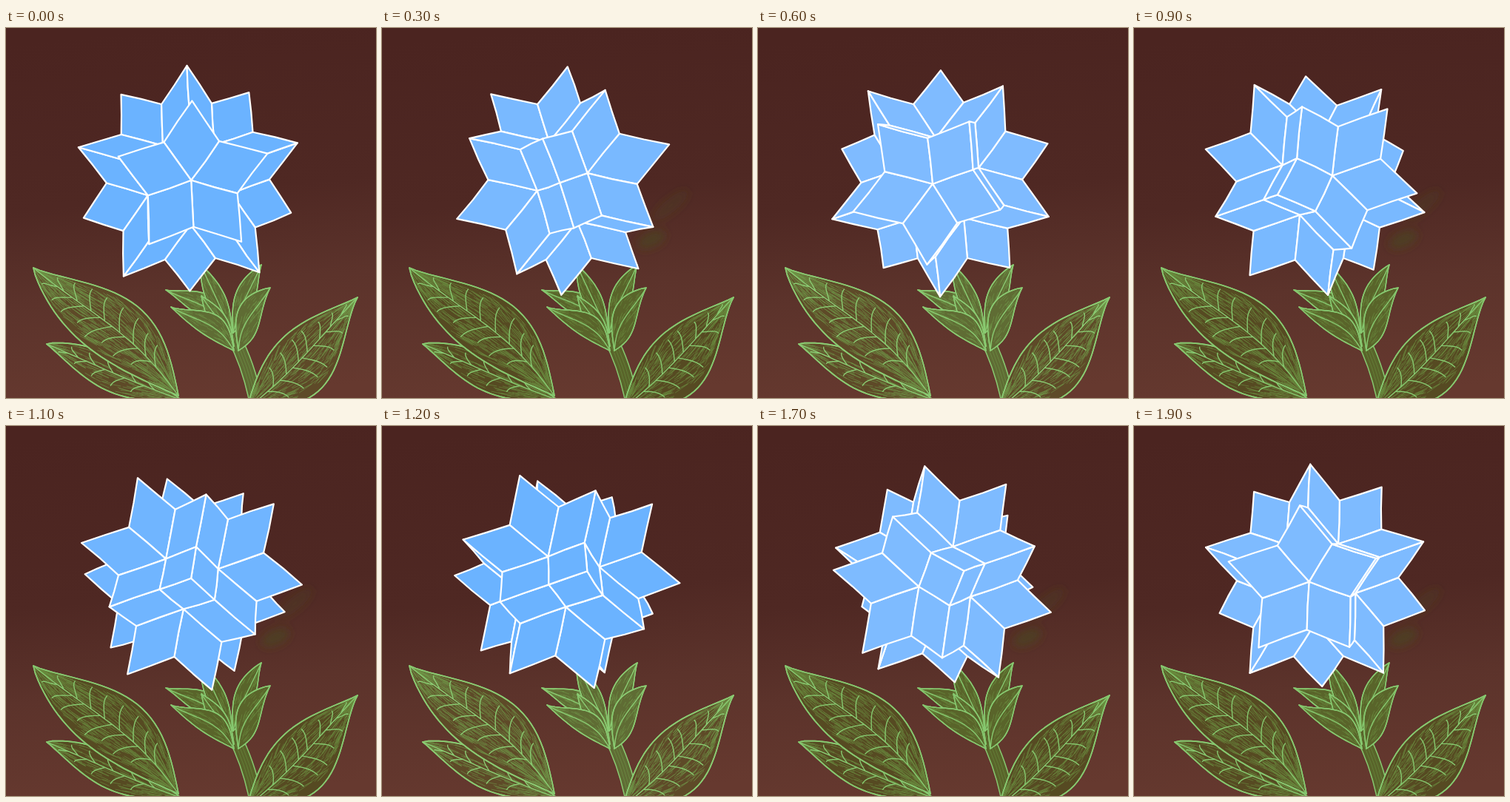
Write an HTML page that moves like this. It is 500 by 500 pixels and loops after 2 s.

```html
<!DOCTYPE html>
<html lang="en">
<head>
<meta charset="utf-8">
<title>Crystal flower</title>
<style>
  html, body { margin: 0; width: 100%; height: 100%; overflow: hidden; background: #4c2521; }
  svg { display: block; width: 100vw; height: 100vh; }
  path { stroke-linecap: round; stroke-linejoin: round; }
  #plant path { fill: none; stroke: var(--line); }
  #plant .leaf { fill: var(--leaf); stroke-width: 1.7; }
  #plant .sepal { fill: var(--sepal); stroke-width: 1.5; }
  #plant .hatch { stroke: var(--hatch); stroke-width: .9; opacity: .65; }
  #plant .vein { stroke-width: 1.4; }
  #gem path { stroke: #fff; stroke-width: 2.2; }
  #smudge { fill: #48481c; }
</style>
</head>
<body>
<svg viewBox="0 0 500 500">
  <defs>
    <linearGradient id="soil" x1=".45" y1="0" x2=".55" y2="1">
      <stop offset="0" stop-color="#4b2420"/>
      <stop offset=".45" stop-color="#4f2823"/>
      <stop offset=".7" stop-color="#5c332b"/>
      <stop offset="1" stop-color="#66392f"/>
    </linearGradient>
    <filter id="soft" x="-1" y="-1" width="3" height="3"><feGaussianBlur stdDeviation="6"/></filter>
  </defs>
  <rect width="500" height="500" fill="url(#soil)"/>
  <g id="smudge" filter="url(#soft)">
    <ellipse cx="364" cy="286" rx="20" ry="10" opacity=".6" transform="rotate(-25 364 286)"/>
    <ellipse cx="390" cy="240" rx="30" ry="9" opacity=".3" transform="rotate(-40 390 240)"/>
  </g>
  <g id="plant"></g>
  <g id="gem"></g>
</svg>
<script>
const $ = id => document.getElementById(id);
const { sin, cos, abs, PI } = Math;
const plant = $('plant'), gem = $('gem');

function addPath(parent, d, cls) {
  const el = document.createElementNS('http://www.w3.org/2000/svg', 'path');
  el.setAttribute('d', d);
  if (cls) el.setAttribute('class', cls);
  return parent.appendChild(el);
}

let seed = 7;
const rand = () => (seed = (seed * 16807) % 2147483647) / 2147483647;
const pt = p => p[0].toFixed(1) + ' ' + p[1].toFixed(1);
const line = pts => 'M' + pts.map(pt).join('L');
const range = (n, f) => Array.from({ length: n }, (_, i) => f(i));

// A blade from tip to base. Each side is [width, skew]; bow bends the midrib.
function blade({ tip, base, left, right, bow, veins = 0, hatch, kind = 'leaf' }) {
  const dx = base[0] - tip[0], dy = base[1] - tip[1], len = Math.hypot(dx, dy);
  // t runs along the midrib, side from -1 (left edge) to 1 (right edge)
  const at = (t, side) => {
    const [width, skew] = side < 0 ? left : right;
    const edge = Math.sign(side) * width * sin(PI * t ** skew);
    const mid = bow * sin(PI * t ** 1.5);
    const off = (mid + (edge - mid) * abs(side)) / len;
    return [tip[0] + dx * t + dy * off, tip[1] + dy * t - dx * off];
  };
  const along = side => range(31, i => at(i / 30, side));
  const rim = line([...along(1), ...along(-1).reverse()]) + 'Z';
  const strokes = range(hatch, () => {
    const t = rand() * .9, side = rand() * 1.8 - .9;
    return line([at(t, side), at(t + .06 + rand() * .04, side * (.8 + rand() * .2))]);
  }).join('');
  const ribs = range(veins * 2, i => {
    const side = i % 2 ? 1 : -1, reach = .6 + rand() * .2;
    const t = .14 + .72 * (i + rand() * .5) / (veins * 2);
    return line(range(7, k => at(t - .07 * sin(k / 6 * PI / 2), side * reach * k / 6)));
  }).join('');
  addPath(plant, rim, kind);
  addPath(plant, strokes, 'hatch');
  addPath(plant, rim, kind).style.fill = 'none';
  addPath(plant, line(along(0)) + ribs, 'vein');
}

function stem() {
  const d = 'M308 418Q328 456 338 506';
  addPath(plant, d).style.strokeWidth = 19;
  addPath(plant, d).style.cssText = 'stroke: var(--sepal); stroke-width: 16';
  for (const x of [-4, 0, 4])
    addPath(plant, d, 'hatch').setAttribute('transform', `translate(${x})`);
}

blade({ tip: [55, 427], base: [236, 502], right: [20, .8], left: [27, 1.1], bow: -2, veins: 5, hatch: 190 });
blade({ tip: [37, 324], base: [233, 497], right: [54, 1.18], left: [32, .83], bow: 12, veins: 8, hatch: 520 });
stem();
blade({ tip: [475, 364], base: [325, 515], right: [52, 1.25], left: [33, 1.1], bow: 5, veins: 7, hatch: 420 });

const sepal = (tip, base, left, right, bow) =>
  blade({ tip, base, left, right, bow, hatch: 80, kind: 'sepal' });
sepal([216, 354], [302, 402], [8, 1.3], [22, 1.2], 6);
sepal([262, 318], [306, 412], [13, 1], [12, 1], 0);
sepal([345, 320], [307, 412], [17, .9], [11, 1.3], -3);
sepal([264, 362], [308, 430], [10, 1], [12, 1], 2);
sepal([357, 351], [314, 436], [25, .85], [10, 1.8], -8);
sepal([223, 377], [308, 436], [5, 1], [26, 1.3], 10);

// Rhombic hexecontahedron: a prolate rhombohedron on every icosahedron face
const PHI = (1 + Math.sqrt(5)) / 2, NORM = Math.hypot(1, PHI);
const axes = [];
for (const s of [-1, 1]) for (const t of [-PHI, PHI])
  axes.push([s, 0, t], [t, s, 0], [0, t, s]);
axes.forEach(v => v.forEach((n, i) => v[i] = n / NORM));

const dot = (a, b) => a[0] * b[0] + a[1] * b[1] + a[2] * b[2];
const cross = (a, b) => [a[1] * b[2] - a[2] * b[1], a[2] * b[0] - a[0] * b[2], a[0] * b[1] - a[1] * b[0]];
const sum = (...vs) => [0, 1, 2].map(i => vs.reduce((n, v) => n + v[i], 0));
const near = (a, b) => dot(a, b) > .4;

const cells = [];
axes.forEach((a, i) => axes.forEach((b, j) => axes.forEach((c, k) => {
  if (!(i < j && j < k && near(a, b) && near(b, c) && near(a, c))) return;
  const [p, q, r] = dot(a, cross(b, c)) > 0 ? [a, b, c] : [a, c, b];
  const tip = sum(p, q, r);
  const face = (u, v, w) => [u, sum(u, v), tip, sum(u, w)];
  cells.push({ tip, faces: [face(p, q, r), face(q, r, p), face(r, p, q)] });
})));
const pool = range(60, () => addPath(gem, ''));

const RAD = PI / 180, TILT = 19.3 * RAD, STEPS = 20;
const CX = 246.5, CY = 207, FOCUS = 1036, EYE = 16;

const looks = [
  { leaf: '#5e4a28', sepal: '#5f6c34', hatch: '#6f9748', line: '#8acb72' },
  { leaf: '#564a22', sepal: '#59642a', hatch: '#6b8f40', line: '#86c86f' }
];

// Hand-drawn edge: a slight bend at the middle, same in both directions
function bend(p, q) {
  const x = (p[0] + q[0]) / 2, y = (p[1] + q[1]) / 2;
  return [x + sin(x * 3.1 + y) * .6, y + cos(x + y * 2.7) * .6];
}

function draw(step) {
  const look = looks[step % 2];
  for (const k in look) plant.style.setProperty('--' + k, look[k]);
  $('smudge').style.display = step % 2 ? '' : 'none';

  // Half a turn per loop, with a slight sway
  const turn = (step * 180 / STEPS - 30 + 1.5 * cos(step * PI / 6)) * RAD;
  const c = cos(turn), s = sin(turn);
  const depth = v => v[2] * c - v[0] * s;
  const project = v => {
    const k = FOCUS / (EYE - depth(v));
    const x = (v[0] * c + v[2] * s) * k, y = v[1] * k;
    return [CX + x * cos(TILT) - y * sin(TILT), CY - x * sin(TILT) - y * cos(TILT)];
  };

  let n = 0;
  cells.sort((a, b) => depth(a.tip) - depth(b.tip));
  for (const { faces } of cells) for (const f of faces) {
    const p = f.map(project);
    const area = (p[1][0] - p[0][0]) * (p[3][1] - p[0][1]) - (p[1][1] - p[0][1]) * (p[3][0] - p[0][0]);
    if (area >= 0) continue;
    pool[n++].setAttribute('d', line(p.flatMap((q, i) => [q, bend(q, p[(i + 1) % 4])])) + 'Z');
  }
  while (n < pool.length) pool[n++].setAttribute('d', '');

  const pale = abs(sin(step * PI / 12));
  gem.setAttribute('fill', `rgb(${107 + 20 * pale},${179 + 8 * pale},255)`);
}

const began = performance.now();
let shown = -1;
function tick() {
  const step = Math.floor((performance.now() - began) / 100) % STEPS;
  if (step !== shown) draw(shown = step);
  requestAnimationFrame(tick);
}
tick();
</script>
</body>
</html>
```
